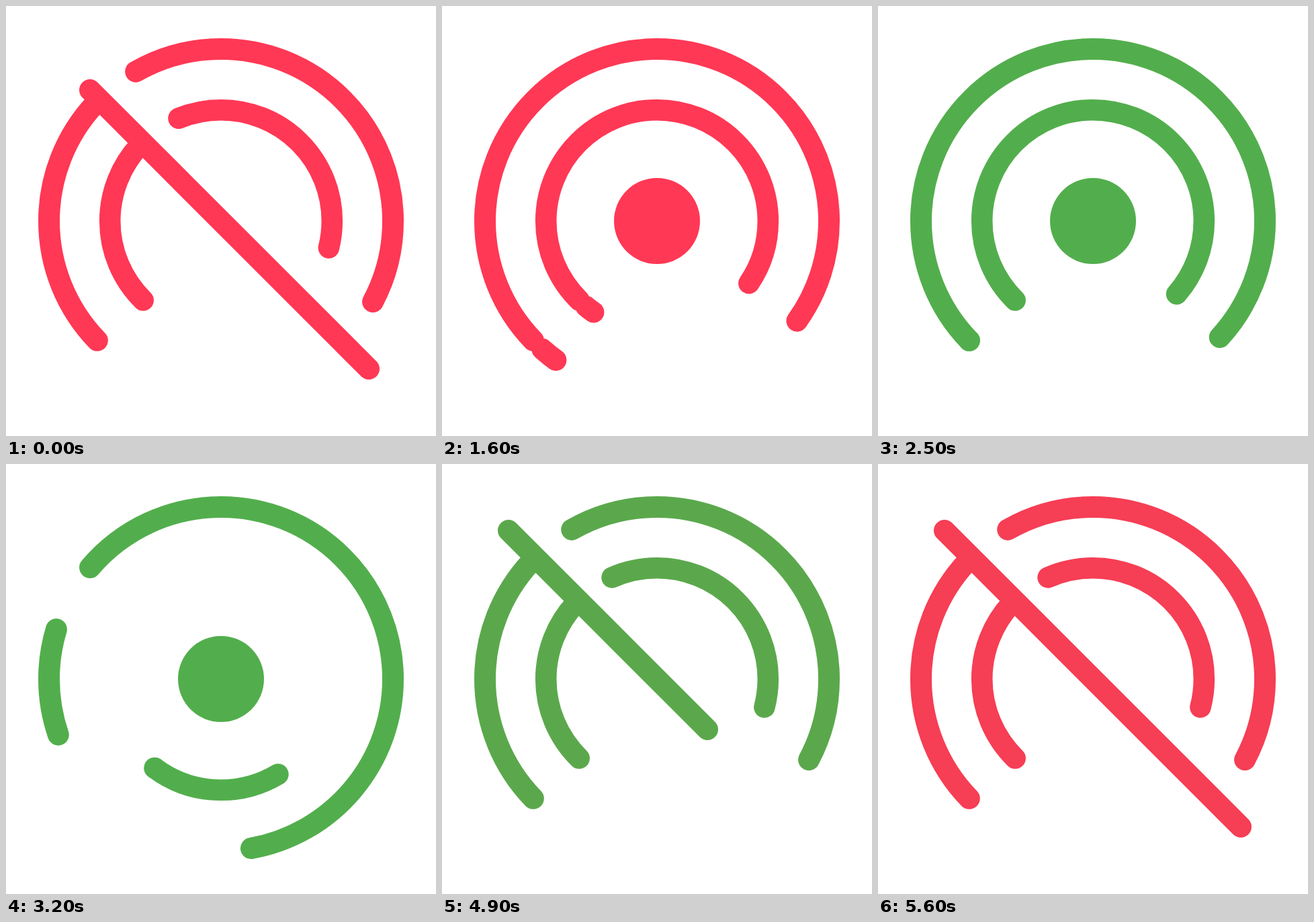
An HTML page that plays this animation: 640x640 px, repeating every 8000 ms.

```html
<!DOCTYPE html>
<html lang="en">
<head>
<meta charset="utf-8">
<title>Signal toggle</title>
<style>
  :root {
    --t: 0ms;
    --in: cubic-bezier(.33, 0, .67, .487);
    --out: cubic-bezier(.33, .484, .67, 1);
    --start: cubic-bezier(.33, .367, .67, .683);
    --slow: cubic-bezier(.33, .444, .67, .798);
    --settle: cubic-bezier(.33, .667, .67, 1);
  }
  html, body { margin: 0; width: 100%; height: 100%; overflow: hidden; background: #fff; }
  svg { display: block; width: 100%; height: 100%; }
  svg, svg * {
    animation: none 8s linear infinite paused;
    animation-delay: var(--t);
  }
  .line { fill: none; stroke: currentColor; stroke-width: 32; stroke-linecap: round; }
  .small { stroke-width: 31.6; }

  svg { animation-name: tint; }
  #dot { animation-name: dot; fill: currentColor; transform-origin: 320px 320px; }
  #outerMain { animation-name: outer-main; }
  #outerTail { animation-name: outer-tail; }
  #innerMain { animation-name: inner-main; }
  #innerTail { animation-name: inner-tail, inner-show; }
  #slash { animation-name: slash, slash-show; }

  @keyframes tint {
    0%, 21.375% { color: rgb(255, 56, 85); }
    31.125%, 60.75% { color: rgb(82, 174, 76); }
    70%, 100% { color: rgb(246, 62, 85); }
  }

  @keyframes dot {
    0%, 7% { transform: scale(0); animation-timing-function: linear; }
    11.25% { transform: scale(.905); animation-timing-function: ease-out; }
    13.25% { transform: scale(1.055); animation-timing-function: ease-in-out; }
    16.25%, 48.5% { transform: scale(1); animation-timing-function: ease-in-out; }
    51.25% { transform: scale(1.053); animation-timing-function: ease-in; }
    56.25%, 100% { transform: scale(0); }
  }

  /* offset = minus the start angle, first dash = length in degrees */
  @keyframes outer-main {
    0% { stroke-dashoffset: -136; stroke-dasharray: 87 273; animation-timing-function: var(--in); }
    11.25% { stroke-dashoffset: -136; stroke-dasharray: 169.1 190.9; animation-timing-function: var(--out); }
    24.25%, 36.875% { stroke-dashoffset: -136; stroke-dasharray: 266.5 93.5; animation-timing-function: var(--start); }
    40% { stroke-dashoffset: -220.4; stroke-dasharray: 219.5 140.5; animation-timing-function: var(--slow); }
    51.25% { stroke-dashoffset: -439.7; stroke-dasharray: 106.8 253.2; animation-timing-function: var(--settle); }
    60.625%, 100% { stroke-dashoffset: -496; stroke-dasharray: 87 273; }
  }
  @keyframes outer-tail {
    0% { stroke-dashoffset: -240.3; stroke-dasharray: 147.7 212.3; animation-timing-function: var(--in); }
    11.25% { stroke-dashoffset: -357.7; stroke-dasharray: 79.9 280.1; animation-timing-function: var(--out); }
    24.25%, 36.875% { stroke-dashoffset: -496; stroke-dasharray: 0 360; animation-timing-function: var(--start); }
    40% { stroke-dashoffset: -521.1; stroke-dasharray: 35.7 324.3; animation-timing-function: var(--slow); }
    51.25% { stroke-dashoffset: -585.3; stroke-dasharray: 126.6 233.4; animation-timing-function: var(--settle); }
    60.625%, 100% { stroke-dashoffset: -600.3; stroke-dasharray: 147.7 212.3; }
  }
  @keyframes inner-main {
    0% { stroke-dashoffset: -134.5; stroke-dasharray: 88.5 271.5; animation-timing-function: var(--in); }
    11.25% { stroke-dashoffset: -134.5; stroke-dasharray: 169.4 190.6; animation-timing-function: var(--out); }
    24.25%, 36.875% { stroke-dashoffset: -134.5; stroke-dasharray: 266.6 93.4; animation-timing-function: var(--start); }
    40% { stroke-dashoffset: -419.1; stroke-dasharray: 67.6 292.4; animation-timing-function: var(--slow); }
    51.25% { stroke-dashoffset: -482.2; stroke-dasharray: 66.5 293.5; animation-timing-function: var(--settle); }
    60.625%, 100% { stroke-dashoffset: -494.5; stroke-dasharray: 88.5 271.5; }
  }
  @keyframes inner-tail {
    0% { stroke-dashoffset: -247.6; stroke-dasharray: 126.4 233.6; animation-timing-function: var(--in); }
    11.25% { stroke-dashoffset: -360; stroke-dasharray: 68.7 291.3; animation-timing-function: var(--out); }
    24.25% { stroke-dashoffset: -494.5; stroke-dasharray: 0 360; }
    40% { stroke-dashoffset: -486.7; stroke-dasharray: 0 360; animation-timing-function: var(--slow); }
    51.25% { stroke-dashoffset: -569.4; stroke-dasharray: 118.4 241.6; animation-timing-function: var(--settle); }
    60.625%, 100% { stroke-dashoffset: -606.1; stroke-dasharray: 128.6 231.4; }
  }
  @keyframes inner-show {
    0% { opacity: 1; animation-timing-function: step-end; }
    24.25% { opacity: 0; animation-timing-function: step-end; }
    40%, 100% { opacity: 1; }
  }

  @keyframes slash {
    0% { stroke-dashoffset: -125; stroke-dasharray: 415 900; animation-timing-function: ease-in; }
    5% { stroke-dashoffset: -72; stroke-dasharray: 0 900; }
    59.375% { stroke-dashoffset: -99; stroke-dasharray: 0 900; }
    61.25% { stroke-dashoffset: -99; stroke-dasharray: 296 900; animation-timing-function: var(--settle); }
    63.75%, 100% { stroke-dashoffset: -99; stroke-dasharray: 441 900; }
  }
  @keyframes slash-show {
    0% { opacity: 1; animation-timing-function: step-end; }
    5.1% { opacity: 0; animation-timing-function: step-end; }
    59.375%, 100% { opacity: 1; }
  }
</style>
</head>
<body>
<svg viewBox="0 0 640 640">
  <circle id="dot" cx="320" cy="320" r="64"/>
  <circle id="outerMain" class="line" cx="320" cy="320" r="256" pathLength="360"/>
  <circle id="outerTail" class="line" cx="320" cy="320" r="256" pathLength="360"/>
  <circle id="innerMain" class="line small" cx="320" cy="320" r="165.3" pathLength="360"/>
  <circle id="innerTail" class="line small" cx="320" cy="320" r="165.3" pathLength="360"/>
  <path id="slash" class="line" d="M0 0L640 640" pathLength="640"/>
</svg>
<script>
  // Advance the keyframes in steps of a tenth of a second.
  const LOOP = 8000, STEP = 100;
  function tick() {
    const t = performance.now() % LOOP;
    const held = Math.floor(t / STEP) * STEP;
    document.documentElement.style.setProperty('--t', -held + 'ms');
    requestAnimationFrame(tick);
  }
  tick();
</script>
</body>
</html>
```
